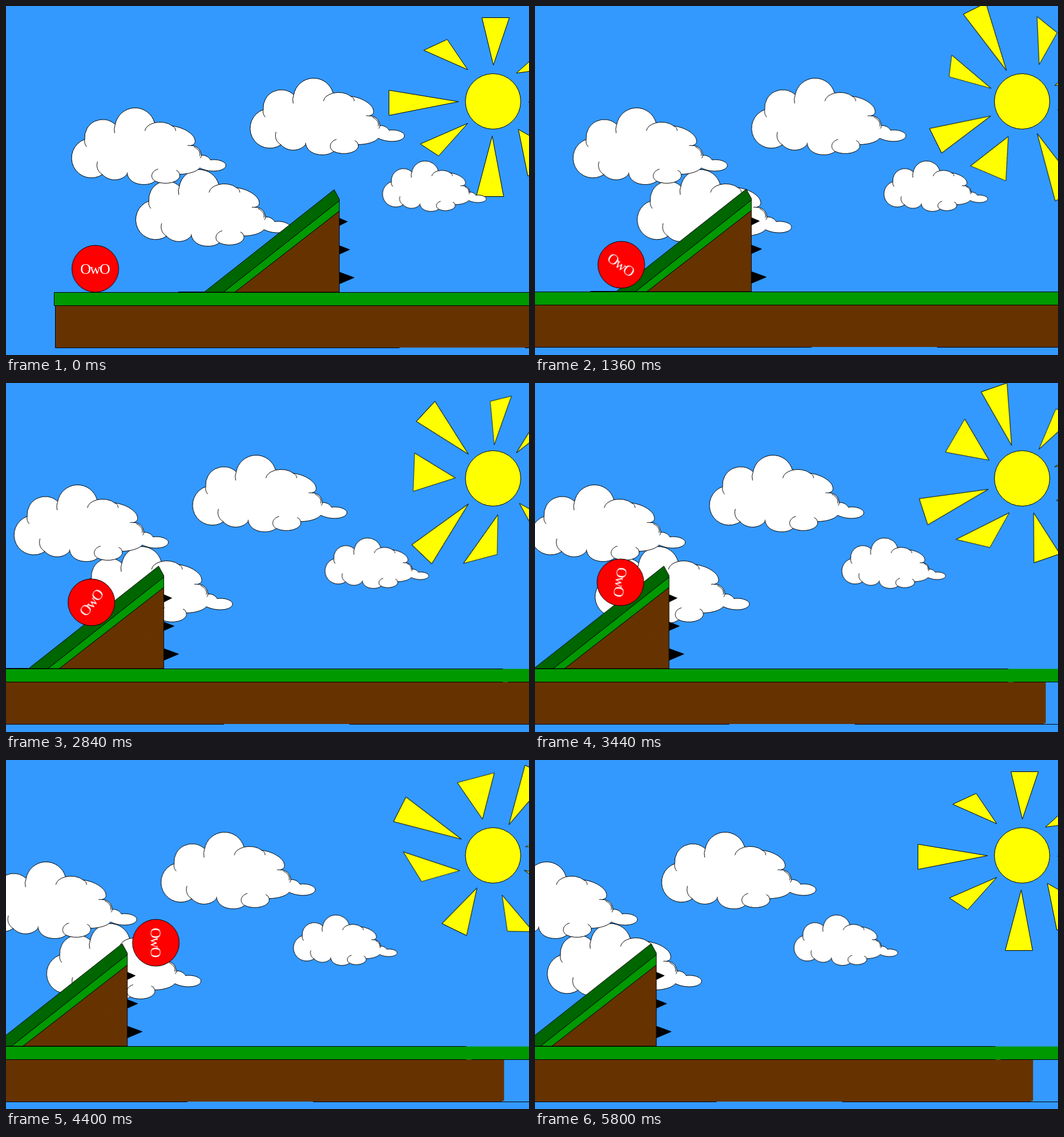
These frames come from a looping animation (917x611 px, 5.84 s). An HTML page:

```html
<!DOCTYPE html>
<html lang="en">
<head>
<meta charset="utf-8">
<title>Rolling ball</title>
<style>
  html, body { margin: 0; width: 100%; height: 100%; overflow: hidden; background: #39f; }
  svg { display: block; width: 917px; height: 611px; }
  .line { stroke: #000; stroke-width: 1; }
  #cloud * { vector-effect: non-scaling-stroke; }
  .none { fill: none; }
  text { font: 26px "Liberation Serif", "Times New Roman", serif; letter-spacing: -2px; fill: #fff; text-anchor: middle; }

  /* 25 pictures per second; the small delay keeps steps clear of rounding. */
  #rays, #clouds, #land, #ball { animation: 5840ms linear -2ms infinite; }
  #rays { animation-name: spin; }
  #clouds { animation-name: drift; animation-timing-function: steps(146); }
  #land { animation-name: pan; }
  #ball { animation-name: path; }
  #face { animation: roll 5840ms linear -2ms infinite; }

  @keyframes drift { to { transform: translate(-207.4px, 0); } }

  @keyframes spin {
    0% { transform: rotate(0deg); animation-timing-function: steps(145); }
    99.315% { transform: rotate(271.4deg); }
    99.316%, 100% { transform: rotate(0deg); }
  }

  @keyframes pan {
    0% { transform: translate(0, 0); animation-timing-function: steps(15); }
    10.274% { transform: translate(-97px, -1px); animation-timing-function: steps(15); }
    20.548% { transform: translate(-194px, -1px); animation-timing-function: steps(64); }
    64.384% { transform: translate(-371.7px, -1px); }
    64.385%, 100% { transform: translate(-371.7px, 0); }
  }

  @keyframes path {
    0% { transform: translate(156.5px, 460px); animation-timing-function: steps(30); }
    20.548% { transform: translate(151.5px, 459.3px); animation-timing-function: steps(4); }
    23.288% { transform: translate(151.3px, 453px); animation-timing-function: steps(16); }
    34.247% { transform: translate(150px, 426px); animation-timing-function: steps(21); }
    48.63% { transform: translate(149.7px, 384px); animation-timing-function: steps(15); }
    58.904% { transform: translate(149.7px, 349px); animation-timing-function: steps(8); }
    64.384% { transform: translate(150px, 329px); animation-timing-function: steps(13); }
    73.288% { transform: translate(202px, 288px); animation-timing-function: steps(3); }
    75.342% { transform: translate(262.7px, 320px); animation-timing-function: steps(10); }
    82.192% { transform: translate(461px, 447px); animation-timing-function: steps(1); }
    82.877% { transform: translate(481px, 463.5px); animation-timing-function: steps(24); }
    99.315%, 100% { transform: translate(965px, 463.5px); }
  }

  @keyframes roll {
    0% { transform: rotate(0deg); animation-timing-function: steps(30); }
    20.548% { transform: rotate(374deg); animation-timing-function: steps(4); }
    23.288% { transform: rotate(396deg); animation-timing-function: steps(16); }
    34.247% { transform: rotate(494deg); animation-timing-function: steps(21); }
    48.63% { transform: rotate(668deg); animation-timing-function: steps(15); }
    58.904% { transform: rotate(818deg); animation-timing-function: steps(8); }
    64.384% { transform: rotate(905deg); animation-timing-function: steps(16); }
    75.342% { transform: rotate(1170deg); animation-timing-function: steps(35); }
    99.315%, 100% { transform: rotate(1800deg); }
  }
</style>
</head>
<body>
<svg viewBox="0 0 917 611">
  <defs>
    <g id="cloud">
      <path fill="#fff" d="M22.5 53 A31.7 31.7 0 0 1 76 27 A35.4 35.4 0 0 1 145 24 A27 17 0 0 1 176 29.5
        C197 32 217 45 216 57 C216 61 212 63 208 64 C217 63 226 69 227 81
        C232 80 240 83 243 89 C256 87 270 92 270 98.5 C270 108 245 113 224 103
        C220 109 205 114 189 114 A25.5 13.5 0 0 1 146 126
        C140 131 132 132 126 132 C112 132 100 126 97 113.5
        C88 126 66 128 53.5 114.5 A34.7 34.7 0 1 1 22.5 53Z"/>
      <path class="none" d="M22.5 53 Q21 60 26 66 M76 27 Q73 34 75 42 M145 24 Q130 28 128 38
        M176 29.5 Q182 32 182 38 M208 64 Q205 63 203 64 M214 66 C222 70 226 76 224 82
        M227 81 Q227 84 225 86 M53.5 114.5 C43 108 43 98 45 92 M97 113.5 V111
        M146 126 C137 121 138 109 151 105 M189 114 Q188 109 183 107"/>
    </g>
  </defs>

  <g class="line" fill="#ff0" transform="translate(854 167)">
    <circle r="48.5"/>
    <path id="rays" d="M-19.5-146.5H28.5L.5-63.5Z M144.4-63.2L92.8-95.9 40.9-49.5Z M182 25.3L182.9-23 62.3 1.3Z
      M112 87.2L61.1 131 44.4 49Z M-29.5 166.5H18.5L-1.5 60.5Z M-127.5 74.5L-95.5 95.5-44.5 38.5Z
      M-182.5-19.5V24.5L-60.5.5Z M-121.5-89.5L-80.5-108.5-44.5-55.5Z"/>
  </g>

  <g id="clouds" class="line">
    <use href="#cloud" x="228" y="288.5"/>
    <use href="#cloud" x="115.5" y="180.5"/>
    <use href="#cloud" x="428.5" y="128.5"/>
    <use href="#cloud" transform="translate(660.5 272.7) scale(.672 .658)"/>
  </g>

  <g id="land">
    <path fill="#630" d="M86 524H1245V596L1240 598H86Z"/>
    <path fill="#090" d="M84.5 501.5H1400V524.5H84.5Z"/>
    <path class="line none" d="M1179 501.5H84.5V524.5H1179M1188 524.5H1400M86.5 524V598.5H690M910 598.5H1400M302 500.5H347"/>
    <g class="line" transform="translate(.4 .5)">
      <path d="M584 371L598 377 584 384Z M584 419L602 426 584 434Z M584 465.5L610 475 584 486Z M577 488L584 485"/>
      <path fill="#060" d="M347 500.5L575 321 584 337.5V340.5L381 500.5Z"/>
      <path fill="#090" d="M381 500.5L584 340.5V358.5L401 500.5Z"/>
      <path fill="#630" d="M401 500.5L584 358.5V500.5Z"/>
    </g>
    <path stroke="#445" d="M554 438.5H556"/>
  </g>

  <g id="ball">
    <circle class="line" r="41" fill="red"/>
    <g id="face"><text x="-1" y="8.5">OwO</text></g>
  </g>
</svg>
</body>
</html>
```
